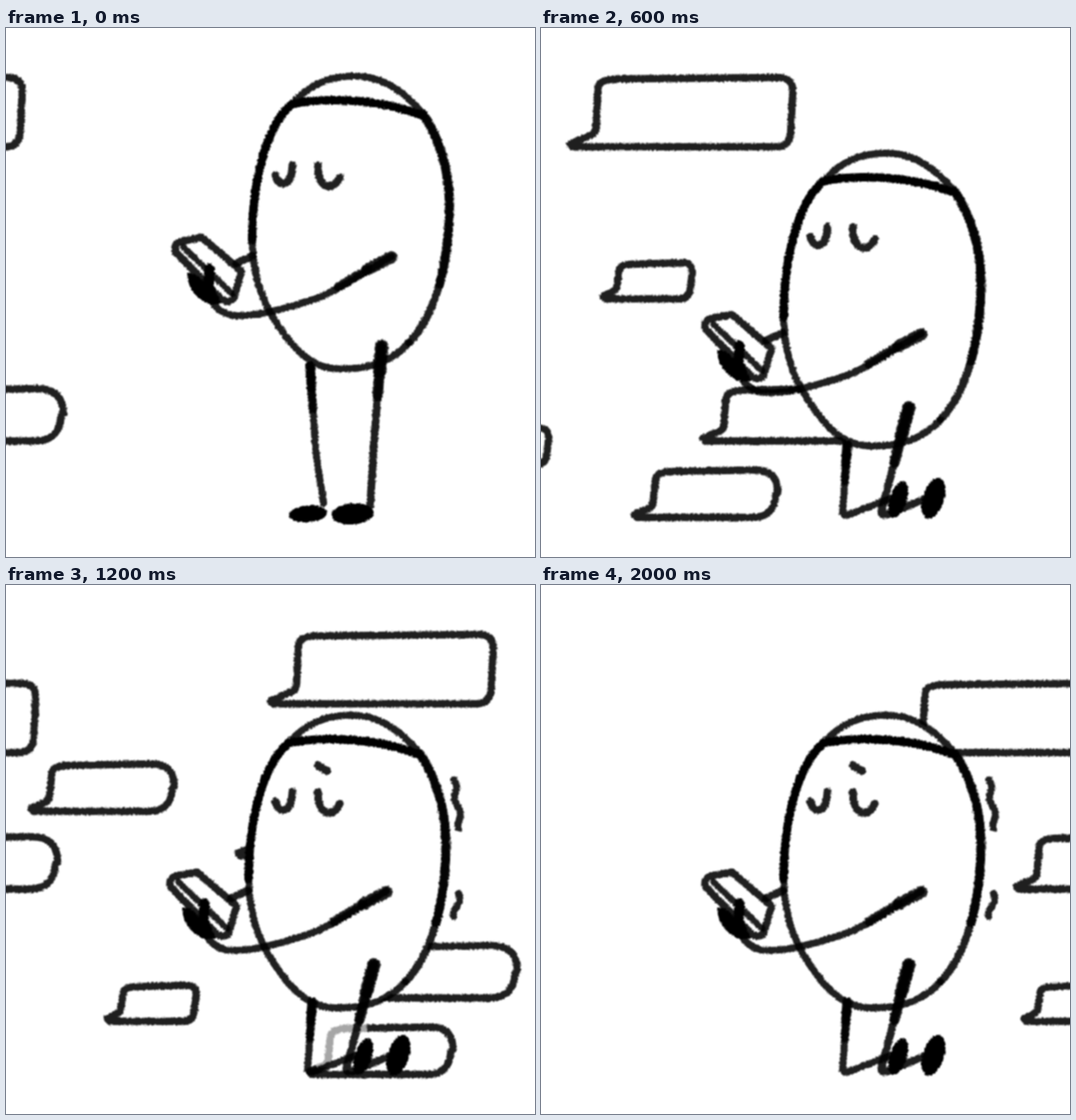
An HTML page for the animation above (2.4 s loop, 748x748 px).

```html
<!DOCTYPE html>
<html lang="en">
<head>
<meta charset="utf-8">
<title>Sinking under messages</title>
<style>
  html, body { margin: 0; width: 100%; height: 100%; overflow: hidden; background: #fff; }
  svg { display: block; width: 100vw; height: 100vh; }
  #scene { fill: none; stroke: #000; stroke-linecap: round; stroke-linejoin: round; }
</style>
</head>
<body>
<svg viewBox="0 0 748 748">
  <filter id="brush" filterUnits="userSpaceOnUse" x="-20" y="-20" width="788" height="788" color-interpolation-filters="sRGB">
    <feTurbulence type="fractalNoise" baseFrequency=".35" numOctaves="2" seed="4"/>
    <feDisplacementMap in="SourceGraphic" scale="4.5" xChannelSelector="R" yChannelSelector="G"/>
    <feGaussianBlur stdDeviation=".9"/>
  </filter>
  <g id="scene" filter="url(#brush)"></g>
</svg>
<script>
const STEP = 200, LOOP = 2400, LAST = 10;
const scene = document.getElementById('scene');

const big = { w: 319, h: 98, round: 20 };
const wide = { w: 237, h: 74, round: 36 };
const medium = { w: 207, h: 67, round: 32 };
const small = { w: 130, h: 51, round: 14 };

// x is the tail tip at step 6; rush, drift and leave are speeds per step
const bubbles = [
  { size: big, y: 70, x: 370, drift: 111, leave: 90 },
  { size: small, y: 332, x: 324, drift: 80, leave: 135 },
  { size: wide, y: 510, x: 486, rush: 147, drift: 87, leave: 52 },
  { size: medium, y: 625, x: 425, rush: 125, drift: 99, leave: 55 },
  { size: small, y: 566, x: 139, drift: 86, leave: 67 },
  { size: medium, y: 253, x: 31, drift: 89, leave: 140 },
  { size: big, y: 139, x: -277, drift: 120, leave: 126 },
  { size: wide, y: 356, x: -164, drift: 120, leave: 140 }
];

// Joints [hip, knee, ankle, foot] when standing, bending and kneeling
const backLeg = { thigh: 14, shin: 10, foot: [27, 12], poses: [
  [[430, 478], [438, 600], [449, 672], [427, 687]],
  [[437, 548], [417, 636], [468, 655], [455, 670]],
  [[433, 590], [426, 692], [500, 663], [505, 667]]
] };
const frontLeg = { thigh: 19, shin: 11, foot: [30, 15], poses: [
  [[531, 450], [520, 590], [515, 675], [490, 687]],
  [[534, 502], [476, 640], [525, 660], [502, 676]],
  [[520, 537], [479, 692], [550, 663], [555, 665]]
] };

const mix = (a, b, t) => a + (b - a) * t;
const between = (p, q, t) => [mix(p[0], q[0], t), mix(p[1], q[1], t)];

const line = (d, width, opacity = .88) =>
  `<path d="${d}" stroke-width="${width}" stroke-opacity="${opacity}"/>`;
const blot = (d, color = '#000') => `<path d="${d}" fill="${color}" stroke="none"/>`;
const move = (x, y, content) => `<g transform="translate(${x} ${y})">${content}</g>`;

// Messages rush in, drift by and speed up on the way out
function tipX({ x, drift, leave, rush = drift }, step) {
  const early = Math.min(step - 2, 0);
  const middle = Math.min(Math.max(step, 2), 6) - 6;
  const late = Math.max(step - 6, 0);
  return x + rush * early + drift * middle + leave * late + 17 * late * late;
}

function bubble({ w, h, round }, x, y) {
  const tail = 15 + w * .09, kink = h * .14 + 3, corner = Math.min(16, h * .22);
  return move(x, y, line(`M4 ${h - 4}L${tail - 10} ${h - kink}Q${tail - 3} ${h - kink - 3} ${tail - 3} ${h - kink - 10}
    L${tail} ${corner}Q${tail} 3 ${tail + corner * 1.6} 2L${w - round} 0Q${w} 0 ${w} ${round}
    L${w - 3} ${h - round}Q${w - 5} ${h} ${w - round - 4} ${h}L8 ${h}Z`, 10.5));
}

function leg({ thigh, shin, foot, poses }, bend) {
  const i = Math.min(1, Math.floor(bend));
  const [hip, knee, ankle, sole] = poses[i].map((p, n) => between(p, poses[i + 1][n], bend - i));
  const turn = -4 - 24 * bend - 5 * bend * bend;
  return line(`M${hip}L${between(hip, knee, .93)}Q${knee} ${between(knee, ankle, .2)}L${ankle}`, shin) +
    line(`M${hip}L${between(hip, knee, .5)}`, mix(shin, thigh, .5)) +
    line(`M${hip}L${between(hip, knee, .25)}`, thigh) +
    `<ellipse rx="${foot[0]}" ry="${foot[1]}" transform="translate(${sole}) rotate(${turn})" fill="#000" stroke="none"/>`;
}

function squiggle(x, y, length, lean) {
  const points = [];
  for (let d = 0; d <= length; d += 3) points.push([x + d * lean + 3 * Math.sin(d / 6), y + d]);
  return line('M' + points.join('L'), 10);
}

const cap = 'M405 107C430 78 460 68 492 68C535 68 565 92 590 122';
const rightSide = 'C612 155 627 200 627 250C627 330 608 405 570 445';
const belly = 'C545 472 515 482 475 482C440 484 415 462 395 435C365 395 350 360 348 300';
const leftSide = 'C348 225 365 140 405 107';
const torso = blot(cap + rightSide + belly + leftSide, '#fff') +
  line(cap, 10) + line('M403 108C440 99 520 97 590 124', 12, 1) +
  line('M590 122' + rightSide, 11) + line('M590 122C612 155 627 200 627 250Q627 310 613 362', 13) +
  line('M570 445' + belly, 10) + line('M348 300' + leftSide, 12, 1);

const eyes = line('M381 208C384 224 404 228 405 194M441 194C440 228 463 232 472 211', 11);
const phone = line('M325 333L349 322', 11) +
  line('M240 317Q236 306 246 302L277 296L333 344L322 382Q315 390 305 384Z', 10.5) +
  line('M251 310L320 376', 9);
const arm = line('M545 323C510 343 475 368 440 382C405 394 350 410 318 406Q300 401 293 389', 10) +
  line('M545 324L512 341', 17) + line('M512 341L470 366', 13) +
  blot('M256 346Q268 345 279 358L281 336Q290 328 295 340L294 366L304 389Q289 395 276 384Q257 372 256 346Z');
const worry = line('M441 255L454 263', 11);
const tremble = squiggle(633, 275, 69, .14) + squiggle(640, 436, 33, -.15);
const veil = blot('M438 596H512L508 682H438Z', '#fff9');

function draw(step) {
  const bend = Math.min(Math.max(step / 2, step - 1), 2);
  const drop = 69.5 * bend - 7.5 * bend * bend;
  const sway = Math.max(bend - 1, 0);
  const tired = step >= 4;

  scene.innerHTML =
    bubbles.map(b => bubble(b.size, tipX(b, step), b.y)).join('') +
    (bend === 2 ? veil : '') +
    move(-5 * sway, drop + 7 * tired, torso) +
    leg(backLeg, bend) + leg(frontLeg, bend) +
    move(0, drop * .8 + 11 * tired, eyes) +
    move(-7 * sway, drop + tired, phone + arm) +
    (tired ? worry : '') +
    (tired && step % 2 === 0 ? tremble : '');
}

let shown = -1;
function tick() {
  const step = Math.min(LAST, Math.floor(performance.now() % LOOP / STEP));
  if (step !== shown) draw(shown = step);
  requestAnimationFrame(tick);
}
tick();
</script>
</body>
</html>
```
